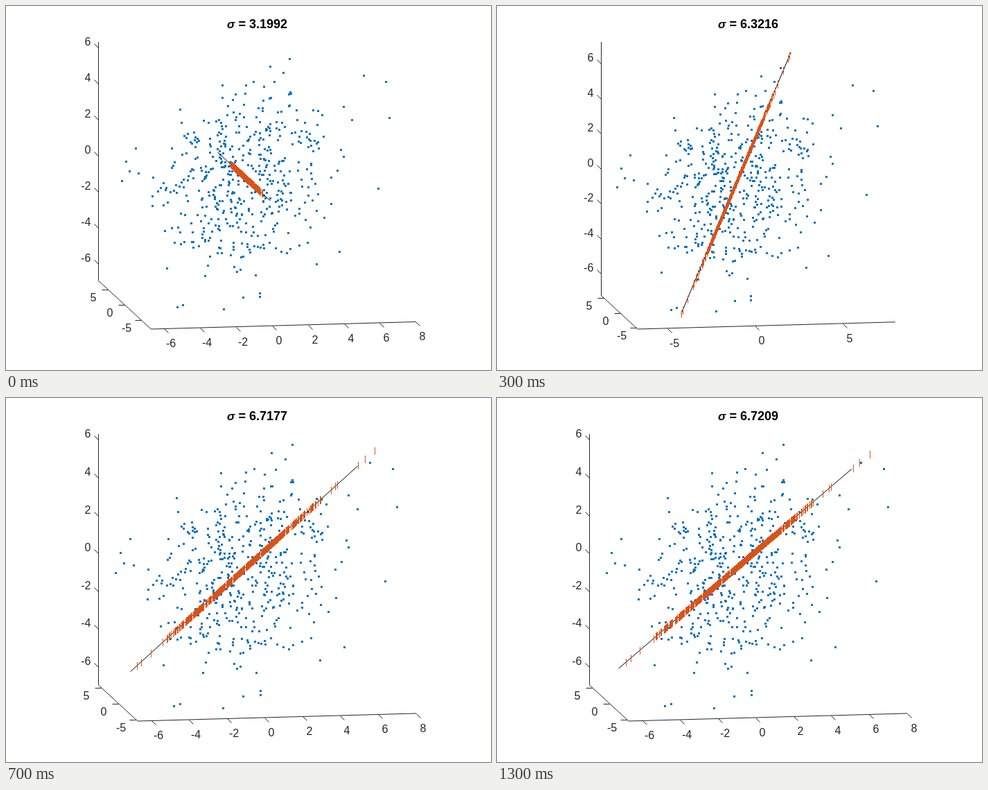
These frames come from a looping animation (700 by 525 pixels, 1.4 s). An HTML page with a canvas:

```html
<!DOCTYPE html>
<html lang="en">
<head>
<meta charset="utf-8">
<title>Principal direction</title>
<style>
html, body { margin: 0; height: 100%; overflow: hidden; background: #fff; }
canvas { display: block; }
</style>
</head>
<body>
<canvas id="stage" width="700" height="525"></canvas>
<script>
const ctx = document.getElementById('stage').getContext('2d');
const STEP = 100, STEPS = 14, COUNT = 490;
const BLUE = '#0072bd', ORANGE = '#d95319', INK = '#262626';
const FONT = '"Liberation Sans", Arial, sans-serif';
const { sin, cos, exp, min, max, round, hypot, sqrt, PI } = Math;

// Pixels on screen per unit of x, y and z, before scaling
const UX = 27.25, UX_RISE = .75, UY = 5, UY_RISE = 4.6, UZ = 27.25;
const TOP = 52, BOTTOM = 466, MIDDLE = 362.5;
const BEST = 50.4 * PI / 180, REACH = 8, MEAN_X = -.08;
const sigmas = [3.1992, 5.5953, 6.0174, 6.3216, 6.5386, 6.6692, 6.7042, 6.7177, 6.7204, 6.7209];

const offset = ([x, y, z]) => [UX * x - UY * y, -UX_RISE * x - UY_RISE * y - UZ * z];

function random(seed) {
  return () => {
    seed = (seed + 0x6d2b79f5) | 0;
    let t = Math.imul(seed ^ (seed >>> 15), 1 | seed);
    t = (t + Math.imul(t ^ (t >>> 7), 61 | t)) ^ t;
    return ((t ^ (t >>> 14)) >>> 0) / 4294967296;
  };
}
const rnd = random(41);
const gauss = () => sqrt(-2 * Math.log(1 - rnd())) * cos(2 * PI * rnd());

// The farthest points, as pixels from the origin
const far = [
  [67, -179], [37, -167], [57, -158], [179, -153], [212, -144], [218, -89], [148, -106], [161, -86],
  [-167, -43], [-181, -23], [-176, -8], [-188, 6], [-162, -5], [201, 18], [142, 113], [107, 132],
  [21, 176], [21, 182], [-4, 183], [-33, 200], [-95, 194], [-104, 197], [-62, 150], [-119, 139]
];
const points = far.map(([dx, dy]) => [dx / UX, 0, (-dy - UX_RISE * dx / UX) / UZ]);
while (points.length < COUNT) {
  const along = gauss() * sqrt(6.72), across = gauss() * sqrt(5), depth = gauss() * sqrt(3.2);
  const p = [along * sin(BEST) + across * cos(BEST), depth, along * cos(BEST) - across * sin(BEST)];
  if (hypot(...offset(p)) < 152) points.push(p);
}

// The unit vector starts along y and swings towards the best fit
function direction(i) {
  const n = i - 1;
  const turn = BEST - PI / 4 * exp(-.074 * n * n - .127 * n);
  const tilt = PI / 2 * exp(-1.26 * i ** .7);
  return [cos(tilt) * sin(turn), sin(tilt), cos(tilt) * cos(turn)];
}

// A box that holds the cloud and the line, fitted to the stage
function fitView(dir) {
  const [, y, z] = dir.map(v => v * REACH);
  const lo = [-6.72, min(-5.5, -y), min(-6.94, -z)];
  const hi = [8.02, max(5.9, y), max(6.31, z)];
  const [w, d, h] = hi.map((v, n) => v - lo[n]);
  const scale = (BOTTOM - TOP) / (UZ * h + UY_RISE * d);
  const corner = MIDDLE + scale * (UY * d - UX * w) / 2;
  const [cx, cy] = offset(lo);
  const project = p => {
    const [x, y] = offset(p);
    return [corner + scale * (x - cx), BOTTOM + scale * (y - cy)];
  };
  return { lo, hi, scale, project };
}

function stroke(color, segments) {
  ctx.strokeStyle = color;
  ctx.beginPath();
  for (const [x1, y1, x2, y2] of segments) {
    ctx.moveTo(x1, y1);
    ctx.lineTo(x2, y2);
  }
  ctx.stroke();
}

const snap = v => round(v) + .5;

// One axis: its line, its ticks by (tx, ty), its labels by (lx, ly)
function drawAxis(view, n, base, step, [tx, ty], [lx, ly], align) {
  const place = v => {
    const p = base.slice();
    p[n] = v;
    return view.project(p);
  };
  const a = place(view.lo[n]), b = place(view.hi[n]);
  if (n === 2) a[0] = b[0] = snap(a[0]);
  stroke(INK, [[...a, ...b]]);
  ctx.textAlign = align;
  for (let v = Math.ceil(view.lo[n] / step) * step; v <= view.hi[n]; v += step) {
    const [x, y] = place(v).map(snap);
    stroke(INK, [[x, y, x + tx, y + ty]]);
    ctx.fillText(v, x + lx, y + ly + 6);
  }
}

function drawAxes(view) {
  const { lo, hi, scale } = view;
  ctx.fillStyle = INK;
  ctx.font = '16px ' + FONT;
  drawAxis(view, 0, lo, scale < .945 ? 5 : 2, [6, 6], [9.5, 20.5], 'center');
  drawAxis(view, 1, lo, 5, [-9, 0], [-21.5, 10], 'center');
  drawAxis(view, 2, [lo[0], hi[1], lo[2]], 2, [-6, -6], [-11, -9.5], 'right');
}

function drawCloud(view) {
  ctx.fillStyle = BLUE;
  for (const p of points) {
    const [x, y] = view.project(p);
    ctx.fillRect(round(x) - 1, round(y) - 1, 3, 3);
  }
}

function drawFit(view, dir) {
  const onLine = t => view.project([MEAN_X + dir[0] * t, dir[1] * t, dir[2] * t]);
  stroke('#000', [[...onLine(-REACH), ...onLine(REACH)]]);
  stroke(ORANGE, points.map(p => {
    const [x, y] = onLine(p.reduce((sum, v, n) => sum + v * dir[n], 0)).map(snap);
    return [x, y - 5.5, x, y + 5.5];
  }));
}

function drawTitle(i) {
  ctx.fillStyle = '#000';
  ctx.textAlign = 'left';
  ctx.font = 'italic bold 17px ' + FONT;
  ctx.fillText('σ', 319, 32);
  ctx.textAlign = 'right';
  ctx.font = 'bold 18px ' + FONT;
  ctx.fillText('= ' + sigmas[min(i, 9)].toFixed(4), 406, 32);
}

function draw(i) {
  const dir = direction(i), view = fitView(dir);
  ctx.fillStyle = '#fff';
  ctx.fillRect(0, 0, 700, 525);
  drawAxes(view);
  drawCloud(view);
  drawFit(view, dir);
  drawTitle(i);
}

const start = performance.now();
function tick() {
  const time = max(0, performance.now() - start);
  draw(Math.floor(time / STEP) % STEPS);
  requestAnimationFrame(tick);
}
tick();
</script>
</body>
</html>
```
